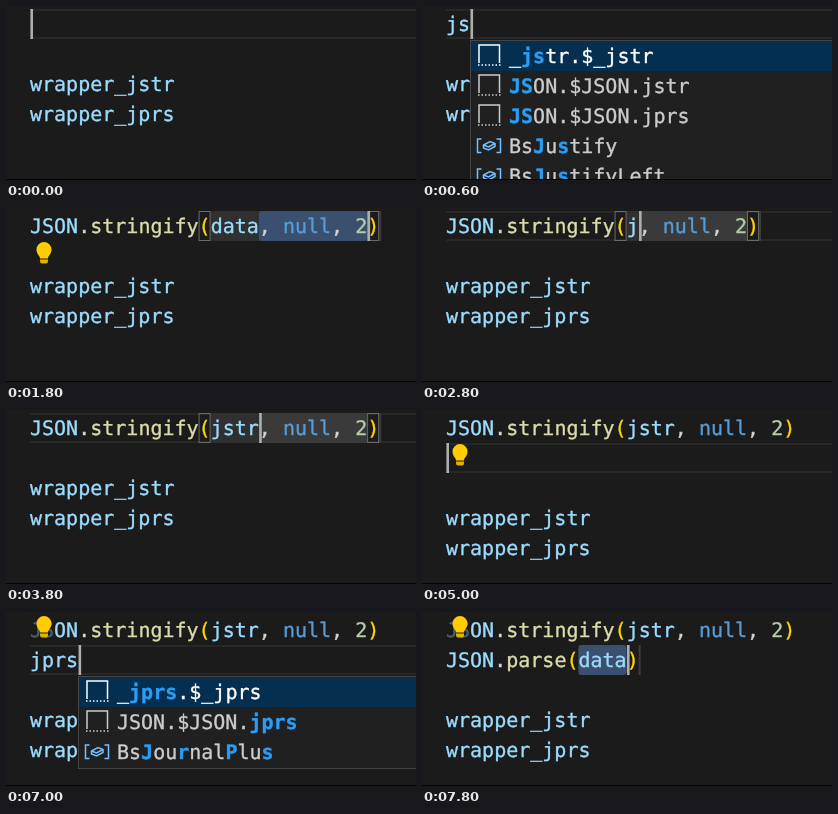
These frames come from a looping animation (410 by 174 pixels, 8 s). An HTML page:

```html
<!DOCTYPE html>
<html lang="en">
<head>
<meta charset="utf-8">
<title>Snippet completion</title>
<style>
html, body { margin: 0; width: 100%; height: 100%; overflow: hidden; background: #1b1b1b; }
svg { display: block; width: 410px; height: 174px; }
text { font: 20px "DejaVu Sans Mono", monospace; white-space: pre; text-rendering: geometricPrecision; stroke-width: .35px; }
</style>
</head>
<body>
<svg id="stage" viewBox="0 0 410 174"></svg>
<script>
const LOOP = 8000, STEP = 200;
const LEFT = 24, TOP = 3, CHAR = 12.04, ROW = 30;
const INK = {
  name: '#9cdcfe', call: '#dcdcaa', paren: '#ffd700',
  word: '#569cd6', num: '#b5cea8', plain: '#d4d4d4'
};
const stage = document.getElementById('stage');

const colX = col => LEFT + col * CHAR;
const rowY = row => TOP + row * ROW;
const rect = (x, y, w, h, fill, more = '') =>
  `<rect x="${x}" y="${y}" width="${w}" height="${h}" fill="${fill}" ${more}/>`;
const span = (s, ink, more = '') => `<tspan fill="${ink}" stroke="${ink}" ${more}>${s}</tspan>`;

// Completion lists; starred parts are the matched letters.
const MENUS = {
  j: ['_*j*str.$_jstr', '_*j*prs.$_jprs', '*J*SON.$JSON.jstr', '*J*SON.$JSON.jprs', 'Bs*J*ournal'],
  js: ['_*js*tr.$_jstr', '*JS*ON.$JSON.jstr', '*JS*ON.$JSON.jprs', 'Bs*J*u*s*tify', 'Bs*J*u*s*tifyLeft'],
  jst: ['_*jst*r.$_jstr', '*JS*ON.$JSON.js*t*r', 'Bs*J*u*st*ify', 'Bs*J*u*st*ifyLeft', 'Bs*J*u*st*ifyRight'],
  jstr: ['_*jstr*.$_jstr', '*JS*ON.$JSON.js*tr*', 'Bs*J*u*st*ify*R*ight'],
  jp: ['_*jp*rs.$_jprs', 'JSON.$JSON.*jp*rs', 'Bs*J*ournal*P*lus', 'Bs*J*ournalArrowU*p*'],
  jpr: ['_*jpr*s.$_jprs', 'JSON.$JSON.*jpr*s', 'Bs*J*ou*r*nal*P*lus', 'Bs*J*ournalA*r*rowU*p*'],
  jprs: ['_*jprs*.$_jprs', 'JSON.$JSON.*jprs*', 'Bs*J*ou*r*nal*P*lu*s*']
};

const stringify = arg => `JSON.stringify(${arg}, null, 2)`;
const DONE = stringify('jstr');

// Typed word on a row, with its completion list.
const typed = (at, word, row, more) =>
  ({ at, row, col: word.length, menu: MENUS[word], lines: row ? [DONE, word] : [word], ...more });
// First call while its placeholders are live.
const filling = (at, arg, col, more) =>
  ({ at, row: 0, col, lines: [stringify(arg)], match: [14, 24 + arg.length], end: 25 + arg.length,
     fields: [[15, arg.length], [15 + arg.length, 9]], ...more });

const STATES = [
  { at: 0, row: 0, col: 0, lines: [''] },
  typed(400, 'j', 0),
  typed(600, 'js', 0),
  typed(800, 'jst', 0),
  typed(1000, 'jstr', 0),
  typed(1200, 'jstr', 0, { bulb: 1 }),
  filling(1400, 'data', 19, { select: [15, 4], bulb: 1 }),
  filling(1800, 'data', 28, { select: [19, 9], bulb: 1 }),
  filling(2400, 'data', 19, { select: [15, 4], bulb: 1 }),
  filling(2800, 'j', 16),
  filling(3000, 'js', 17),
  filling(3200, 'jst', 18),
  filling(3400, 'jstr', 19),
  { at: 4200, row: 0, col: 29, lines: [DONE], match: [14, 28] },
  { at: 4600, row: 0, col: 29, lines: [DONE], match: [14, 28], bulb: 1 },
  { at: 5000, row: 1, col: 0, lines: [DONE, ''], bulb: 1 },
  typed(5400, 'j', 1),
  typed(5800, 'jp', 1),
  typed(6000, 'jpr', 1),
  typed(6200, 'jprs', 1),
  typed(6800, 'jprs', 1, { bulb: 0 }),
  { at: 7400, row: 1, col: 15, lines: [DONE, 'JSON.parse(data)'],
    fields: [[11, 4]], select: [11, 4], end: 16, bulb: 0 }
];

function inkOf(token) {
  if (/^(stringify|parse)$/.test(token)) return INK.call;
  if (token === 'null') return INK.word;
  if (/^\d/.test(token)) return INK.num;
  if (/^[()]/.test(token)) return INK.paren;
  return /^\w/.test(token) ? INK.name : INK.plain;
}

function codeLine(code, row) {
  const tokens = code.match(/\w+|[()]|[^\w()]+/g) || [];
  return `<text x="${LEFT}" y="${rowY(row) + 22}">${tokens.map(t => span(t, inkOf(t))).join('')}</text>`;
}

function bulb(row) {
  const y = rowY(row);
  const cover = row ? '' : rect(LEFT, y, 23, ROW, '#1b1b1b', 'opacity=".65"');
  return cover + `<g transform="translate(38 ${y + 8.5})" fill="#ffcc00">
    <path d="M-4 9C-4 6-7.5 5-7.5 0A7.5 7.5 0 0 1 7.5 0C7.5 5 4 6 4 9Z"/>
    <path d="M-4 10H4V11.5Q4 14 2 14H-2Q-4 14-4 11.5Z" fill="#e0b400"/></g>`;
}

function snippetIcon(x, y, ink) {
  return `<g transform="translate(${x} ${y})" fill="none" stroke="${ink}" stroke-width="1.5">
    <path d="M1 19V1H21.5V19"/><path d="M0 21H23" stroke-dasharray="1.5 2"/></g>`;
}

function valueIcon(x, y) {
  return `<g transform="translate(${x} ${y})" fill="none" stroke="#75beff" stroke-width="1.5">
    <path d="M4 4H0V17.5H4M19 4H23V17.5H19"/>
    <path d="M6 10L12.5 6.5L17.5 8.5V11.5L11 15L6 13ZM6 10L11 12L17.5 8.5"/></g>`;
}

function menu(items, col, row) {
  const x = Math.round(colX(col)), y = rowY(row + 1) + 1, h = items.length * ROW + 3;
  let out = rect(x + .5, y + .5, 420, h - 1, '#202020', 'stroke="#454545"');
  items.forEach((item, i) => {
    const top = y + 2 + i * ROW;
    const ink = i ? '#cccccc' : '#ffffff';
    if (!i) out += rect(x + 1, top - 1, 410, ROW, '#042f50');
    out += item.startsWith('Bs') ? valueIcon(x + 7.5, top + 3) : snippetIcon(x + 8, top + 2, ink);
    const parts = item.split('*').map((s, n) =>
      n % 2 ? span(s, '#2a9df4', 'font-weight="bold"') : span(s, ink));
    out += `<text x="${x + 39}" y="${top + 21}">${parts.join('')}</text>`;
  });
  return out;
}

function draw(time) {
  const s = STATES.findLast(state => state.at <= time);
  const y = rowY(s.row);
  const caretOn = (time - s.at) % 1000 < 500;
  let out = rect(0, 0, 410, 174, '#1b1b1b');

  if (!s.select) {
    out += rect(LEFT, y, 386, 2, '#282828') + rect(LEFT, y + 28, 386, 2, '#282828');
  }
  (s.fields || []).forEach(([col, n], i) => {
    out += rect(colX(col), y, n * CHAR, ROW, i ? '#3a3a3a' : '#303030');
  });
  if (s.select) out += rect(colX(s.select[0]), y, s.select[1] * CHAR, ROW, '#3a506e', 'rx="4"');
  (s.match || []).forEach(col => {
    out += rect(colX(col) + .5, y + .5, CHAR - 1, ROW - 1, 'none', 'stroke="#6b6b6b"');
  });
  if (s.end) out += rect(colX(s.end), y, 2, ROW, '#3c3c3c');

  [...s.lines, '', 'wrapper_jstr', 'wrapper_jprs'].forEach((code, row) => {
    out += codeLine(code, row);
  });
  if (s.bulb !== undefined) out += bulb(s.bulb);
  if (caretOn) out += rect(colX(s.col) + .4, y, 2.6, ROW, '#aeafad');
  if (s.menu) out += menu(s.menu, s.col, s.row);
  stage.innerHTML = out + rect(0, 173, 410, 1, '#050505');
}

let shown = -1;
function tick() {
  const time = Math.floor(performance.now() % LOOP / STEP) * STEP;
  if (time !== shown) draw(shown = time);
  requestAnimationFrame(tick);
}
tick();
</script>
</body>
</html>
```
